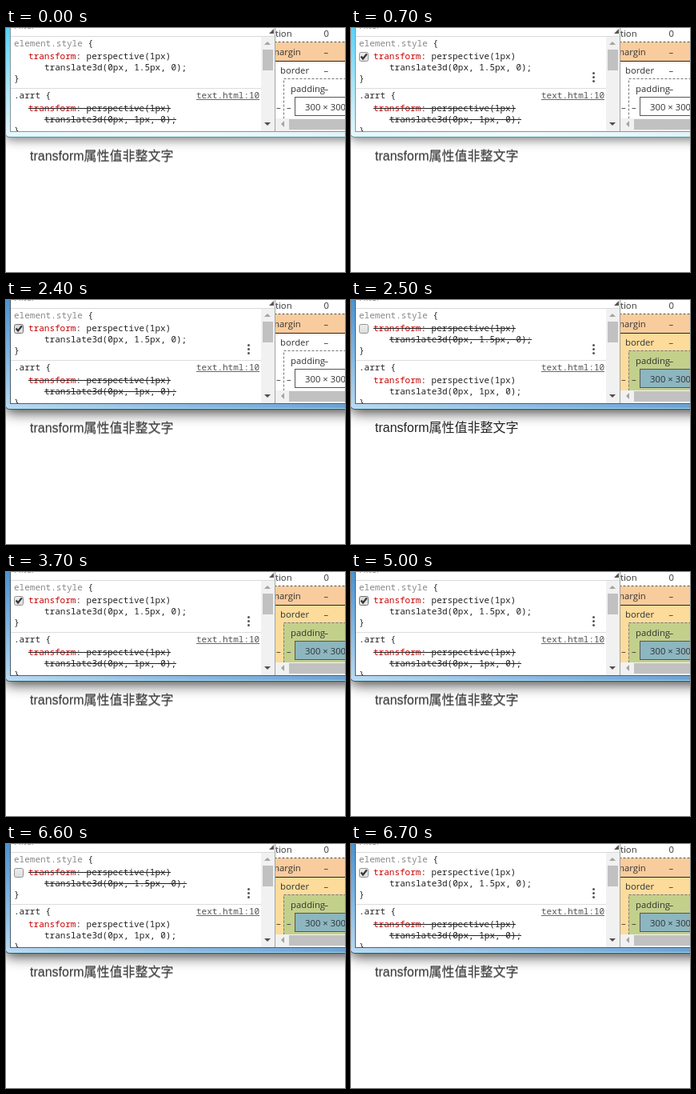
An HTML page with a canvas that plays this animation: 424x305 px, repeating every 8000 ms.

```html
<!DOCTYPE html>
<html lang="zh">
<head>
<meta charset="utf-8">
<style>
html, body { margin: 0; width: 100%; height: 100%; overflow: hidden; background: #fff; }
canvas { display: block; width: 424px; height: 305px; }
</style>
</head>
<body>
<canvas id="stage"></canvas>
<script>
const W = 424, H = 305, LOOP = 8000;
const MONO = '11px "Noto Sans Mono", monospace';
const UI = '11.3px "Open Sans", sans-serif';
const PAGE = '16px "Liberation Sans", "Noto Sans CJK SC", "Noto Sans CJK", sans-serif';

const STEPS = [
  { at: 0, hover: false, active: false, filled: false, checked: true, blurred: true },
  { at: 700, hover: true },
  { at: 2400, active: true, pressed: true },
  { at: 2500, filled: true, checked: false, blurred: false, pressed: false },
  { at: 3600, blurred: true },
  { at: 3700, checked: true },
  { at: 5000, pressed: true },
  { at: 5100, checked: false, blurred: false, pressed: false },
  { at: 6600, blurred: true },
  { at: 6700, checked: true }
];

const THEMES = {
  idle: {
    side: ['#55d3f8', '#a5e4f8', '#e2f5fa'], base: ['#e6f7fb', '#f3faf8', '#e4f2f8'],
    edge: '#6f8a92', inner: '#87969c', shadow: 'rgba(0,0,0,.5)', blur: 13
  },
  active: {
    side: ['#4b92d0', '#7db4e2', '#b4d6f0'], base: ['#b9d9f1', '#8dbce4', '#6ba2d6'],
    edge: '#35536b', inner: '#4f5d69', shadow: 'rgba(0,0,0,.8)', blur: 17
  }
};

const canvas = document.getElementById('stage');
const ratio = window.devicePixelRatio || 1;
canvas.width = W * ratio;
canvas.height = H * ratio;
const ctx = canvas.getContext('2d');
ctx.scale(ratio, ratio);

function rect(x, y, w, h, color) {
  ctx.fillStyle = color;
  ctx.fillRect(x, y, w, h);
}

function text(str, x, y, font, color) {
  ctx.font = font;
  ctx.fillStyle = color;
  ctx.fillText(str, x, y);
}

function shape(points, color) {
  ctx.fillStyle = color;
  ctx.beginPath();
  points.forEach(([x, y]) => ctx.lineTo(x, y));
  ctx.fill();
}

function dot(x, y, r, color) {
  ctx.fillStyle = color;
  ctx.beginPath();
  ctx.arc(x, y, r, 0, Math.PI * 2);
  ctx.fill();
}

function outline(x, y, w, h, color, dash = []) {
  ctx.strokeStyle = color;
  ctx.lineWidth = 1;
  ctx.setLineDash(dash);
  ctx.strokeRect(x + 0.5, y + 0.5, w, h);
  ctx.setLineDash([]);
}

function clipped(x, y, w, h, radius, paint) {
  ctx.save();
  ctx.beginPath();
  ctx.roundRect(x, y, w, h, radius);
  ctx.clip();
  paint();
  ctx.restore();
}

function gradient(x0, y0, x1, y1, colors) {
  const g = ctx.createLinearGradient(x0, y0, x1, y1);
  colors.forEach((c, i) => g.addColorStop(i / (colors.length - 1), c));
  return g;
}

function drawFrame(theme) {
  ctx.save();
  ctx.shadowColor = theme.shadow;
  ctx.shadowBlur = theme.blur * ratio;
  ctx.shadowOffsetY = 3 * ratio;
  ctx.fillStyle = theme.edge;
  ctx.beginPath();
  ctx.roundRect(-1, -40, W + 60, 177, 6);
  ctx.fill();
  ctx.restore();
  clipped(-1, -40, W + 60, 176, 6, () => {
    rect(0, 0, 5, 130, gradient(0, 0, 0, 130, theme.side));
    rect(0, 130, W, 6, gradient(0, 0, W, 0, theme.base));
    rect(0, 135, W, 1, 'rgba(190,240,250,.7)');
  });
  rect(5, 0, W, 130, theme.inner);
  rect(6, 0, W, 129, '#fff');
}

function declaration(y, value, struck) {
  text('transform', 28, y, MONO, '#c80000');
  text(': perspective(1px)', 28 + 9 * 6.6, y, MONO, '#222');
  text(value, 48, y + 14, MONO, '#222');
  if (struck) {
    rect(28, y - 4, 178, 1, '#222');
    rect(48, y + 10, value.length * 6.6, 1, '#222');
  }
}

function drawCheckbox({ checked, pressed }) {
  ctx.beginPath();
  ctx.roundRect(10.5, 30.5, 11, 11, 2);
  ctx.fillStyle = gradient(0, 30, 0, 42, pressed ? ['#d8d8d8', '#e6e6e6'] : ['#eee', '#dcdcdc']);
  ctx.fill();
  ctx.strokeStyle = pressed ? '#707070' : '#929292';
  ctx.lineWidth = 1;
  ctx.stroke();
  if (!checked) return;
  ctx.beginPath();
  [[12.6, 35.6], [15, 38.4], [19.8, 32.4]].forEach(([x, y]) => ctx.lineTo(x, y));
  ctx.strokeStyle = '#333';
  ctx.lineWidth = 2.3;
  ctx.stroke();
}

function drawStyles(s) {
  text('Filter', 10, 1, UI, '#888');
  rect(6, 10, 330, 1, '#dadada');
  shape([[335, 1], [335, 7], [329, 7]], '#555');
  text('element.style', 10, 23, MONO, '#888');
  text('{', 102.4, 23, MONO, '#222');
  declaration(39, 'translate3d(0px, 1.5px, 0);', !s.checked);
  text('}', 10, 67, MONO, '#222');
  rect(6, 75, 313, 1, '#ddd');
  text('.arrt {', 10, 88, MONO, '#222');
  text('text.html:10', 238, 88, MONO, '#555');
  rect(238, 89, 79, 1, '#666');
  declaration(104, 'translate3d(0px, 1px, 0);', s.checked);
  text('}', 10, 132, MONO, '#222');
  if (s.hover) {
    drawCheckbox(s);
    [56.5, 61.5, 66.5].forEach(y => dot(303.5, y, 1.5, '#555'));
  }
  rect(319, 11, 17, 118, '#f1f1f1');
  rect(321, 27, 13, 26, '#c1c1c1');
  shape([[323, 21], [327, 17], [331, 21]], '#a3a3a3');
  shape([[323, 118], [331, 118], [327, 122]], '#505050');
}

function drawBoxModel(filled) {
  const fill = color => filled ? color : '#fff';
  const label = (str, x, y) => text(str, x, y, UI, '#333');
  rect(337, 18, 87, 95, '#f9cc9d');
  outline(330, 17, 120, 120, '#555', [3, 2]);
  rect(337, 41, 87, 72, fill('#fddc9b'));
  outline(336, 41, 120, 100, '#222');
  rect(347, 63, 77, 50, fill('#c3d08b'));
  outline(347, 63, 100, 80, '#777', [3, 2]);
  rect(361, 86, 63, 24, fill('#8cb6c0'));
  outline(361, 86, 100, 23, '#555');
  label('position', 315, 11);
  label('0', 397.5, 11);
  label('margin', 331.5, 34);
  label('border', 343, 57);
  label('padding', 356, 80);
  label('300 × 300', 374, 103);
  [34, 57, 80].forEach(y => label('–', 397.5, y));
  [338, 351].forEach(x => label('–', x, 103));
  rect(337, 113, 87, 16, '#f1f1f1');
  rect(354, 114, 70, 13, '#c1c1c1');
  shape([[348, 116], [348, 124], [344, 120]], '#a3a3a3');
}

function drawPageText(blurred) {
  const line = 'transform属性值非整文字';
  if (!blurred) return text(line, 30, 165, PAGE, '#222');
  text(line, 30, 165, PAGE, 'rgba(0,0,0,.52)');
  text(line, 30, 166, PAGE, 'rgba(0,0,0,.52)');
}

function draw(s) {
  rect(0, 0, W, H, '#fff');
  drawFrame(s.active ? THEMES.active : THEMES.idle);
  clipped(6, 0, 330, 129, 0, () => drawStyles(s));
  clipped(337, 0, 87, 129, 0, () => drawBoxModel(s.filled));
  rect(336, 0, 1, 129, '#a3a3a3');
  drawPageText(s.blurred);
}

const start = performance.now();
let shown = 0;

function tick(now) {
  const t = Math.max(0, now - start) % LOOP;
  const past = STEPS.filter(step => step.at <= t);
  if (past.length !== shown) {
    shown = past.length;
    draw(Object.assign({}, ...past));
  }
  requestAnimationFrame(tick);
}
tick(start);
</script>
</body>
</html>
```
